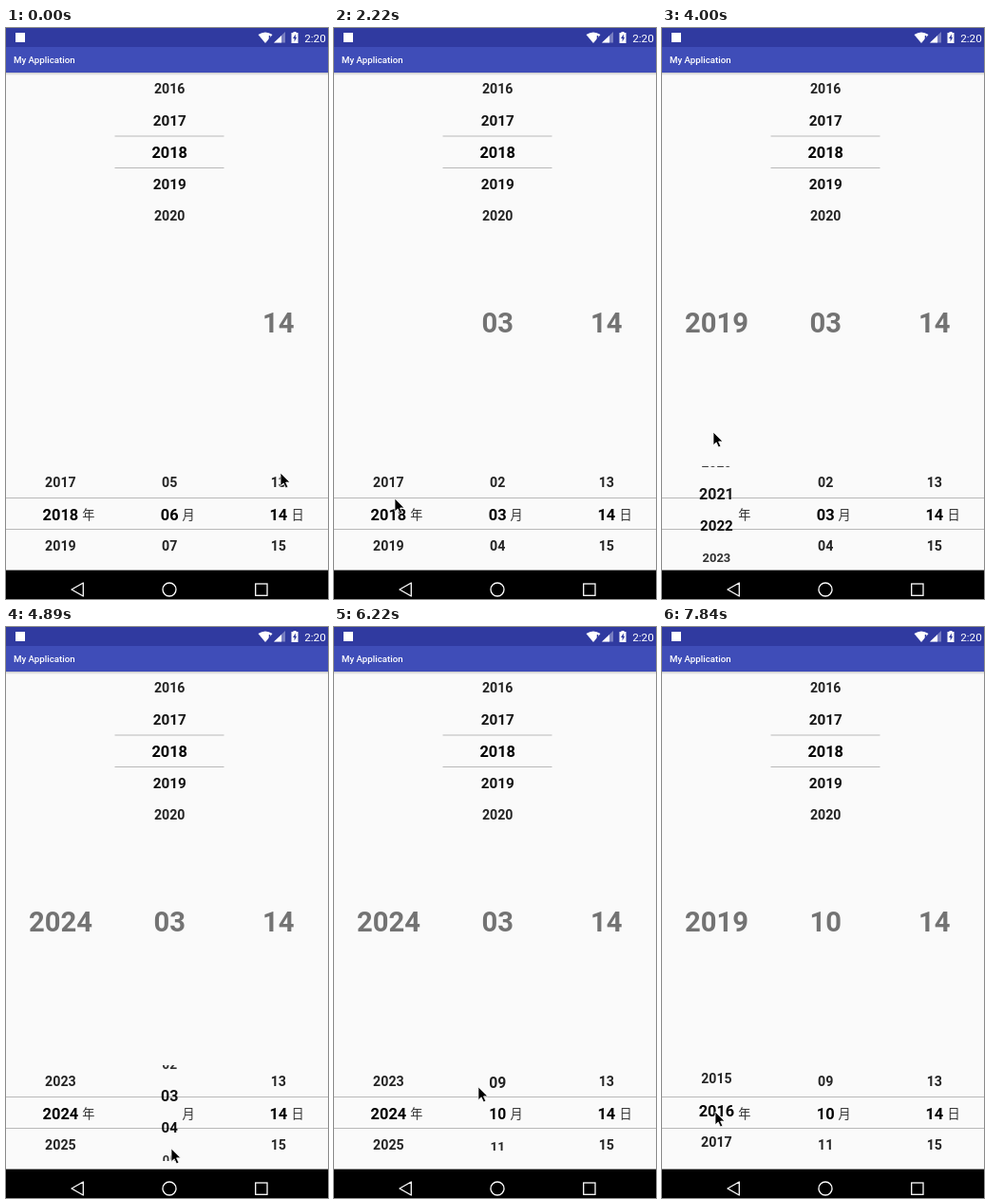
Animation, 339 px wide and 602 px high, one loop 7990 ms. Source, as an HTML page:

```html
<!DOCTYPE html>
<html lang="en">
<head>
<meta charset="utf-8">
<title>Date wheels</title>
<style>
  html, body { margin: 0; width: 100%; height: 100%; overflow: hidden; background: #fafafa; }
  svg { display: block; width: 100%; height: 100%; }
  text { font-family: Roboto, sans-serif; }
  .digits text { font-weight: 700; text-anchor: middle; }
  .units text { font: 13.2px "Noto Sans CJK SC", "Noto Sans CJK JP", "Noto Sans CJK", sans-serif; text-anchor: middle; fill: #333; }
  .big text { fill: #737373; }
  .rules { stroke: #b9b9b9; stroke-width: 1; }
  .nav { fill: none; stroke: #fff; stroke-width: 1.3; }
</style>
</head>
<body>
<svg viewBox="0 0 339 602">
  <defs>
    <clipPath id="window"><rect y="462" width="339" height="101"/></clipPath>
    <linearGradient id="shade" x2="0" y2="1">
      <stop stop-color="#000" stop-opacity=".2"/><stop offset="1" stop-color="#000" stop-opacity="0"/>
    </linearGradient>
  </defs>
  <rect width="339" height="602" fill="#fafafa"/>

  <rect width="339" height="20" fill="#303aa0"/>
  <rect y="20" width="339" height="27" fill="#3f4db8"/>
  <rect y="47" width="339" height="3" fill="url(#shade)"/>
  <g fill="#fff">
    <rect x="10" y="5" width="10" height="10"/>
    <path d="M265.500 7Q273 2 280.500 7L273 16Z"/>
    <path d="M277.500 8V15" stroke="#303aa0" stroke-width="1.500"/>
    <path d="M294 4V15.500H282Z" opacity=".35"/>
    <path d="M290 8V15.500H282Z"/>
    <path d="M300.500 5H302.500V4H305.500V5H307.500V16H300.500Z"/>
    <path d="M304.800 6.500L302 11H303.600V14.500L306.200 9.800H304.800Z" fill="#303aa0"/>
    <text x="314.200" y="15" font-size="11.700">2:20</text>
    <text x="8" y="37" font-size="9.700" font-weight="500">My Application</text>
  </g>

  <path class="rules" d="M114.500 114H229.500M114.500 147.500H229.500M0 495.500H339M0 528.500H339"/>
  <g class="digits" id="yearList"></g>
  <g class="digits big" id="results"></g>
  <g class="digits" id="wheels" clip-path="url(#window)"></g>
  <g class="units">
    <text x="86.900" y="518">年</text><text x="192.100" y="518">月</text><text x="307" y="518">日</text>
  </g>

  <rect y="571.600" width="339" height="31" fill="#000"/>
  <g class="nav">
    <path d="M81.300 585V599L69 592Z" stroke-linejoin="round"/>
    <circle cx="172" cy="592" r="7"/>
    <rect x="262.700" y="586" width="12.300" height="12.300"/>
  </g>
  <path id="cursor" d="M0 0V13.800L3.200 10.900L5.500 16L7.900 15L5.600 10H10Z" stroke="#fff" stroke-width=".8"/>
</svg>
<script>
const LOOP = 7990, STEPS = 54, ROW = 33.4;
const REST = 0.6; // a wheel reports its value after standing still this long
const pad = n => String(n).padStart(2, "0");
const month = n => pad((n + 11) % 12 + 1);

// Swipes are [start, end, value reached], timed in steps.
const columns = [
  { x: 57.4, first: 2018, name: pad,
    swipes: [[15.5, 18, 2019], [25, 31.4, 2024], [47, 49.9, 2019], [50.6, 53.5, 2016]] },
  { x: 172.2, first: 6, name: month,
    swipes: [[3, 7.3, 10], [9, 13.4, 3], [32.5, 37.7, 6], [37.95, 42.4, 10]] },
  { x: 286.8, first: 14, name: pad, shown: "14", swipes: [] }
];

// Turning points of the hand: [step, x, y]
const turns = [
  [0, 289, 469], [3, 175, 544], [6, 171, 481], [9, 172, 470], [12, 172, 571],
  [15, 64, 496], [23, 62, 588], [27, 54, 426], [32, 174, 553], [38, 174, 506],
  [40, 173, 470], [47, 61, 549], [49, 61, 590], [51, 58, 450], [53, 56, 511]
];

const clamp = v => Math.min(1, Math.max(0, v));
const easeOut = p => 1 - (1 - clamp(p)) ** 2;
const easeBoth = p => (1 - Math.cos(Math.PI * clamp(p))) / 2;

function position({ first, swipes }, step) {
  let value = first;
  for (const [start, end, to] of swipes)
    value += (to - value) * easeOut((step - start) / (end - start));
  return value;
}

function reported({ swipes, name, shown = "" }, step) {
  swipes.forEach(([, end, to], i) => {
    const due = end + REST, next = swipes[i + 1];
    if (due <= step && !(next && next[0] < due)) shown = name(to);
  });
  return shown;
}

function hand(step) {
  let [, x, y] = turns[0];
  for (let i = 1; i < turns.length; i++) {
    const [from] = turns[i - 1], [to, nextX, nextY] = turns[i];
    const p = easeBoth((step - from) / (to - from));
    x += (nextX - x) * p;
    y += (nextY - y) * p;
  }
  return `translate(${x} ${y})`;
}

function label(text, x, middle, size, alpha = 1) {
  return `<text x="${x}" y="${middle + size * 0.355}" font-size="${size}" fill-opacity="${alpha}">${text}</text>`;
}

// Rows shrink away from the selected one; the next row grows while it rolls in.
function wheel(x, middle, value, reach, name) {
  const base = Math.floor(value + 1e-6), roll = value - base;
  let rows = "";
  for (let k = -reach; k <= reach + (roll > 0.01); k++) {
    const size = 16.4 - 2.2 * Math.abs(k) / reach + (k > 0 ? 1.5 : -0.7) * roll;
    const alpha = 1 - 0.14 * Math.abs(k - roll) / reach;
    rows += label(name(base + k), x, middle + (k - roll) * ROW, size, alpha);
  }
  return rows;
}

const find = id => document.getElementById(id);
const wheels = find("wheels"), results = find("results"), cursor = find("cursor");
find("yearList").innerHTML = wheel(172.2, 131, 2018, 2, pad);

function draw(step) {
  wheels.innerHTML = columns.map(c => wheel(c.x, 512.8, position(c, step), 1, c.name)).join("");
  results.innerHTML = columns.map(c => label(reported(c, step), c.x, 310.8, 29.2)).join("");
  cursor.setAttribute("transform", hand(step));
}

let drawn = -1;
const start = performance.now();
function tick() {
  const time = (performance.now() - start) % LOOP;
  const step = Math.min(STEPS - 1, Math.floor(time / LOOP * STEPS + 0.1));
  if (step !== drawn) draw(drawn = step);
  requestAnimationFrame(tick);
}
tick();
</script>
</body>
</html>
```
